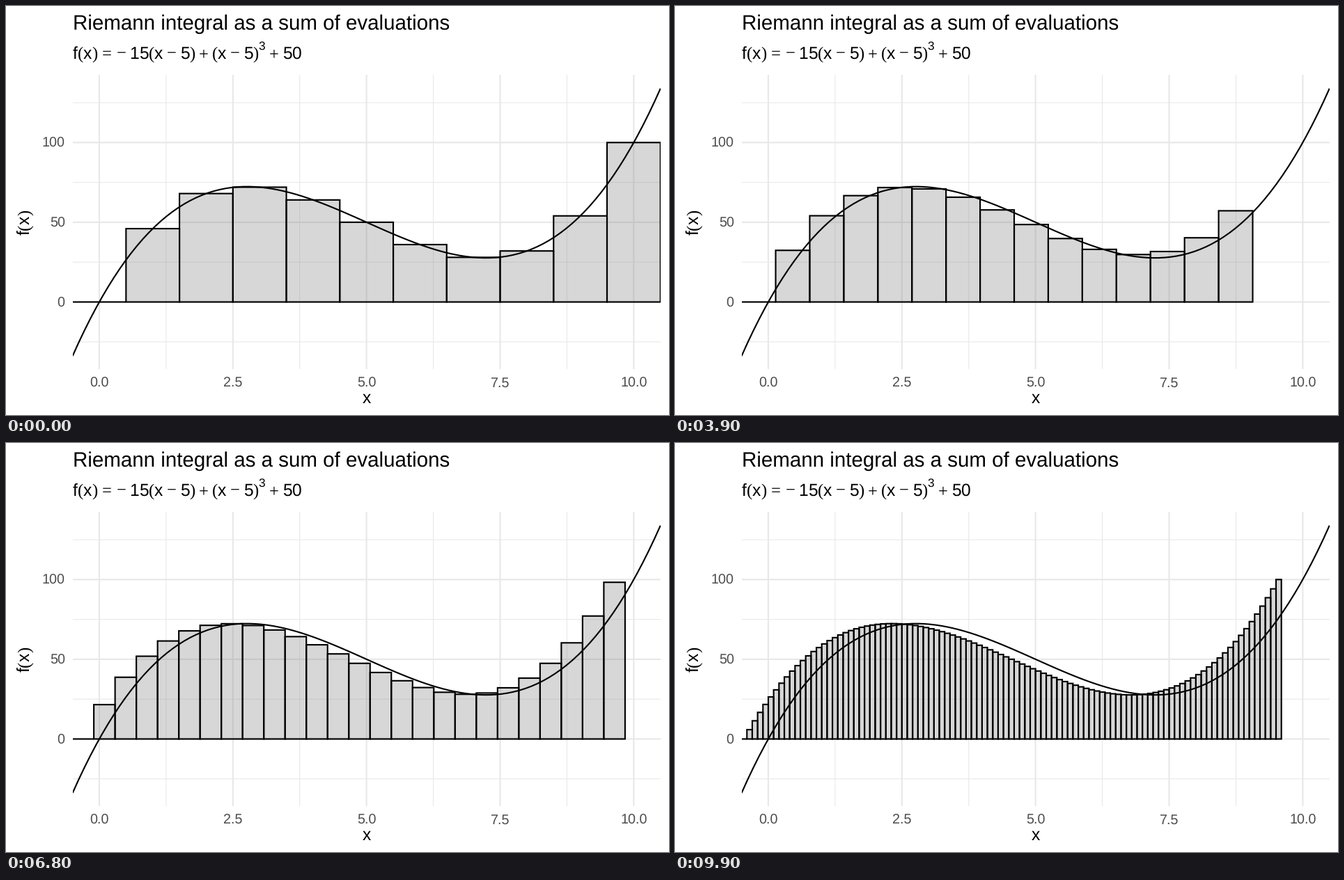
These frames come from a looping animation (952x588 px, 10000 ms). A matplotlib script:

```python
import numpy as np
import matplotlib.pyplot as plt
from matplotlib.animation import FuncAnimation
from matplotlib.collections import PolyCollection

W, H, DPI = 952, 588, 64
LEFT, RIGHT, TOP, BOTTOM = 95.6, 939.75, 99.4, 522.4
PX = 72 / DPI                      # points per pixel
STROKE = 2.13 * PX
GRID = "#E8E8E8"
TITLE, BODY, TICK = 29.5, 24.6, 19.7

STATES, STEPS = 10, 11             # bar widths 1.0, 0.9 ... 0.1

plt.rcParams.update({
    "font.family": "Liberation Sans",
    "text.hinting": "none",
    "path.snap": False,
})


def f(x):
    return -15 * (x - 5) + (x - 5) ** 3 + 50


def ease(t):
    """Cubic in and out."""
    return 4 * t ** 3 if t < 0.5 else 1 - 4 * (1 - t) ** 3


fig = plt.figure(figsize=(W / DPI, H / DPI), dpi=DPI, facecolor="white")
ax = fig.add_axes([LEFT / W, 1 - BOTTOM / H, (RIGHT - LEFT) / W, (BOTTOM - TOP) / H])
ax.set_axis_off()

curve_x = np.linspace(-0.5, 10.5, 101)
curve_y = f(curve_x)
pad = 0.05 * np.ptp(curve_y)
y_low, y_high = curve_y.min() - pad, curve_y.max() + pad
ax.set_xlim(-0.5, 10.5)
ax.set_ylim(y_low, y_high)


def x_px(x):
    return LEFT + (x + 0.5) / 11 * (RIGHT - LEFT)


def y_px(y):
    return BOTTOM - (y - y_low) / (y_high - y_low) * (BOTTOM - TOP)


def label(x, y, text, size, **kw):
    kw.setdefault("va", "baseline")
    return fig.text(x / W, 1 - y / H, text, fontsize=size * PX, **kw)


# Math layout: advance widths and gaps in em
ADVANCE = {"f": 0.278, "x": 0.5, "(": 0.333, ")": 0.333,
           "=": 0.549, "+": 0.549, "\u2212": 0.549}
GAPS = {" ": 4 / 18, "~": 5 / 18}


def formula(x, y, text, size, upright=False):
    """Set a formula glyph by glyph; '^' raises the next character."""
    pos, raised = 0, False
    for ch in text:
        if ch in GAPS:
            pos += GAPS[ch] * size
        elif ch == "^":
            raised = True
        else:
            s = size * (0.7 if raised else 1)
            lift = 0.48 * size if raised else 0
            font = "Liberation Serif" if ch in "()=+\u2212" else "Liberation Sans"
            px, py = (x - lift, y - pos) if upright else (x + pos, y - lift)
            label(px, py, ch, s, family=font, rotation=90 if upright else 0,
                  rotation_mode="anchor")
            pos += ADVANCE.get(ch, 0.556) * s
            raised = False


# Grid
for minor in (True, False):
    width = STROKE / 2 if minor else STROKE
    shift = 1 if minor else 0
    for x in np.arange(0, 10.1 - shift, 2.5) + 1.25 * shift:
        ax.axvline(x, color=GRID, lw=width, zorder=1)
    for y in np.arange(0, 101 + 50 * shift, 50) - 25 * shift:
        ax.axhline(y, color=GRID, lw=width, zorder=1)

# Text
label(LEFT, 33.3, "Riemann integral as a sum of evaluations", TITLE)
formula(LEFT, 76, "f(x)~=~\u2212 15(x \u2212 5) + (x \u2212 5)^3 + 50", BODY)
for x in np.arange(0, 10.1, 2.5):
    label(x_px(x), 547.8, f"{x:.1f}", TICK, color="#4D4D4D", ha="center")
for y in (0, 50, 100):
    label(84.7, y_px(y) + 7, str(y), TICK, color="#4D4D4D", ha="right")
label(x_px(5), 571, "x", BODY, ha="center")
formula(34, 328.8, "f(x)", BODY, upright=True)

bars = PolyCollection([], facecolors=(0.5, 0.5, 0.5, 0.31), edgecolors="black",
                      linewidths=STROKE, joinstyle="miter", zorder=2)
ax.add_collection(bars, autolim=False)
ax.plot(curve_x, curve_y, color="black", lw=STROKE, zorder=3,
        solid_capstyle="butt", solid_joinstyle="round")


def bar_width(state):
    return (STATES - state) / STATES


def update(frame):
    state, step = divmod(frame, STEPS)
    t = ease(step / STEPS)
    w0 = bar_width(state)
    w1 = bar_width(min(state + 1, STATES - 1))
    i = np.arange(int(10 / w0 + 1e-9) + 1)
    w = w0 + (w1 - w0) * t
    tops = f(i * w0) * (1 - t) + f(i * w1) * t
    lefts = i * w - 0.5
    bars.set_verts([[(x, 0), (x, top), (x + w, top), (x + w, 0)]
                    for x, top in zip(lefts, tops)])
    return (bars,)


anim = FuncAnimation(fig, update, frames=(STATES - 1) * STEPS + 1, interval=100,
                     repeat=True, repeat_delay=0, blit=False)
plt.show()
```
